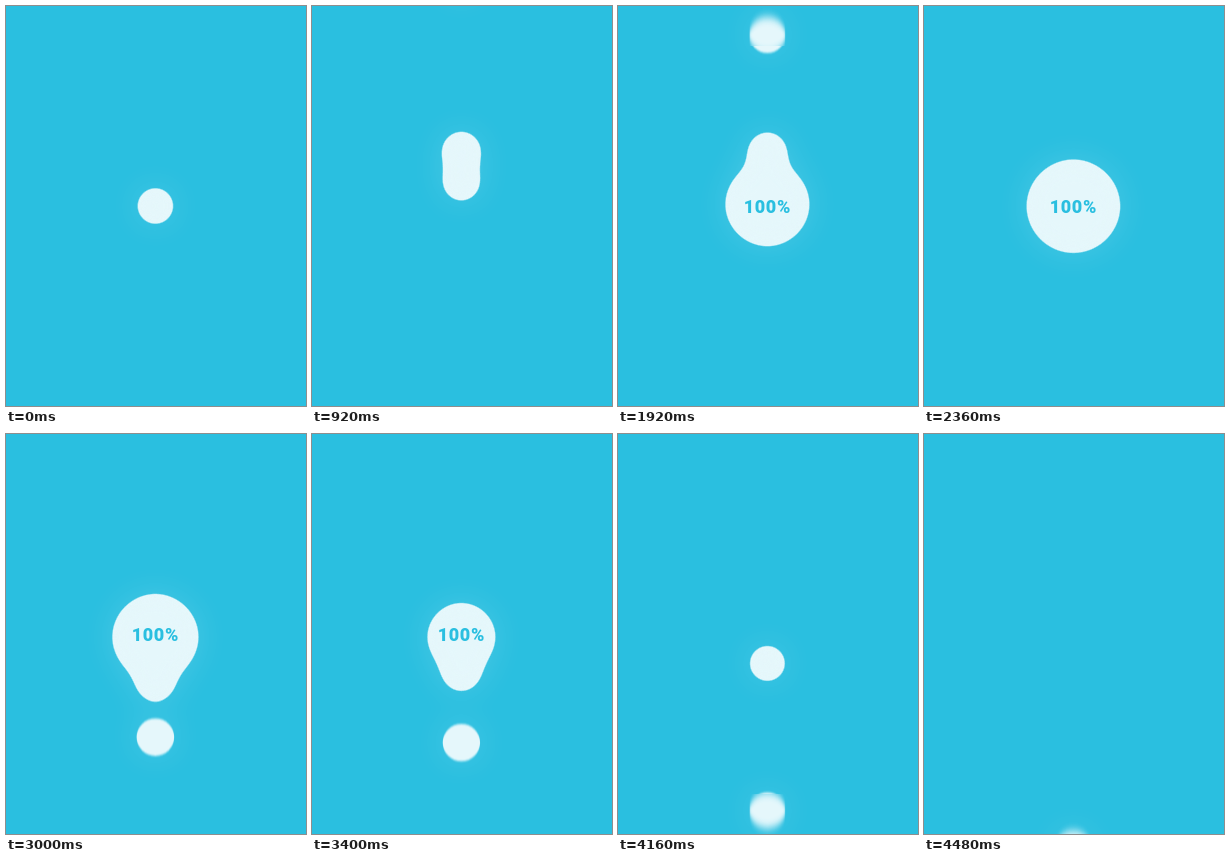
These frames come from a looping animation (300 px wide and 400 px high, 4.52 s). An HTML page without scripts:

```html
<!DOCTYPE html>
<html lang="en">
<head>
<meta charset="utf-8">
<title>Liquid loader</title>
<style>
:root {
  --bg: #2abfe0;
  --loop: 4520ms;
  --arrive: cubic-bezier(.14, .85, .12, 1);
  --leave: cubic-bezier(.88, 0, .86, .15);
}
html, body { margin: 0; width: 100%; height: 100%; overflow: hidden; background: var(--bg); }
svg { display: block; width: 300px; height: 400px; }
circle { cx: 149.4px; cy: 200px; r: 17px; translate: 0 -250px; }
.glow { fill: #e5f7fb; filter: blur(.7px) drop-shadow(0 0 16px rgba(255, 255, 255, .15)); }

/* --i is the place of a drop in its queue */
.in { animation: in var(--loop) var(--arrive) calc(522ms + 190ms * var(--i)) infinite backwards; }
.out { animation: out var(--loop) var(--leave) calc(1628ms + 196ms * var(--i)) infinite backwards; }
.core {
  animation: core-in var(--loop) var(--arrive) infinite,
    core-out var(--loop) var(--leave) infinite,
    core-size var(--loop) linear infinite;
}
text {
  font: 900 18px Roboto, "Open Sans", sans-serif;
  letter-spacing: .6px;
  fill: var(--bg);
  animation: label var(--loop) linear infinite;
}
@keyframes in {
  0% { translate: 0 -250px; r: 17px; }
  29.27% { translate: 0 0; r: 20px; }
  29.28%, 100% { translate: 0 -250px; }
}
@keyframes out {
  0% { translate: 0 250px; }
  .01% { translate: 0 0; r: 20px; }
  29.27%, 100% { translate: 0 250px; r: 17px; }
}
@keyframes core-in {
  0%, 11.7% { translate: 0 -250px; }
  36.5% { translate: 0 -3px; animation-timing-function: linear; }
  66%, 100% { translate: 0 3px; }
}
@keyframes core-out {
  0%, 75% { transform: translateY(0); }
  99.75%, 100% { transform: translateY(250px); }
}
@keyframes core-size {
  0%, 20% { r: 18px; }
  33.6% { r: 33.3px; }
  48%, 62.8% { r: 45.3px; }
  90.5%, 100% { r: 17.8px; }
}
@keyframes label {
  0%, 20.6% { opacity: 0; }
  24%, 87.2% { opacity: 1; }
  90.7%, 100% { opacity: 0; }
}
</style>
</head>
<body>
<svg viewBox="0 0 300 400">
  <!-- Gooey in the middle band, vertical motion blur further out -->
  <filter id="liquid" filterUnits="userSpaceOnUse" x="40" y="-80" width="220" height="560" color-interpolation-filters="sRGB">
    <feGaussianBlur in="SourceGraphic" stdDeviation="10"/>
    <feColorMatrix values="1 0 0 0 0  0 1 0 0 0  0 0 1 0 0  0 0 0 20 -7.5" result="goo"/>
    <feGaussianBlur in="SourceGraphic" stdDeviation=".4 1.3" result="slow"/>
    <feGaussianBlur in="SourceGraphic" stdDeviation=".4 4.5" result="fast"/>
    <feOffset in="goo" y="122" height="156" result="mid"/>
    <feOffset in="slow" y="40" height="82" result="above"/>
    <feOffset in="slow" y="278" height="82" result="below"/>
    <feOffset in="fast" y="-40" height="80" result="top"/>
    <feOffset in="fast" y="360" height="80" result="bottom"/>
    <feMerge>
      <feMergeNode in="mid"/>
      <feMergeNode in="above"/>
      <feMergeNode in="below"/>
      <feMergeNode in="top"/>
      <feMergeNode in="bottom"/>
    </feMerge>
  </filter>
  <g class="glow">
    <g filter="url(#liquid)">
      <circle class="core"/>
      <circle class="in" style="--i:.75"/>
      <circle class="in" style="--i:2"/>
      <circle class="in" style="--i:3"/>
      <circle class="in" style="--i:3.8"/>
      <circle class="in" style="--i:5"/>
      <circle class="in" style="--i:6"/>
      <circle class="in" style="--i:7"/>
      <circle class="out" style="--i:1"/>
      <circle class="out" style="--i:1.7"/>
      <circle class="out" style="--i:3"/>
      <circle class="out" style="--i:4"/>
      <circle class="out" style="--i:5"/>
      <circle class="out" style="--i:5.8"/>
      <circle class="out" style="--i:6.5"/>
    </g>
  </g>
  <text x="125.8" y="206.5">100%</text>
</svg>
</body>
</html>
```
